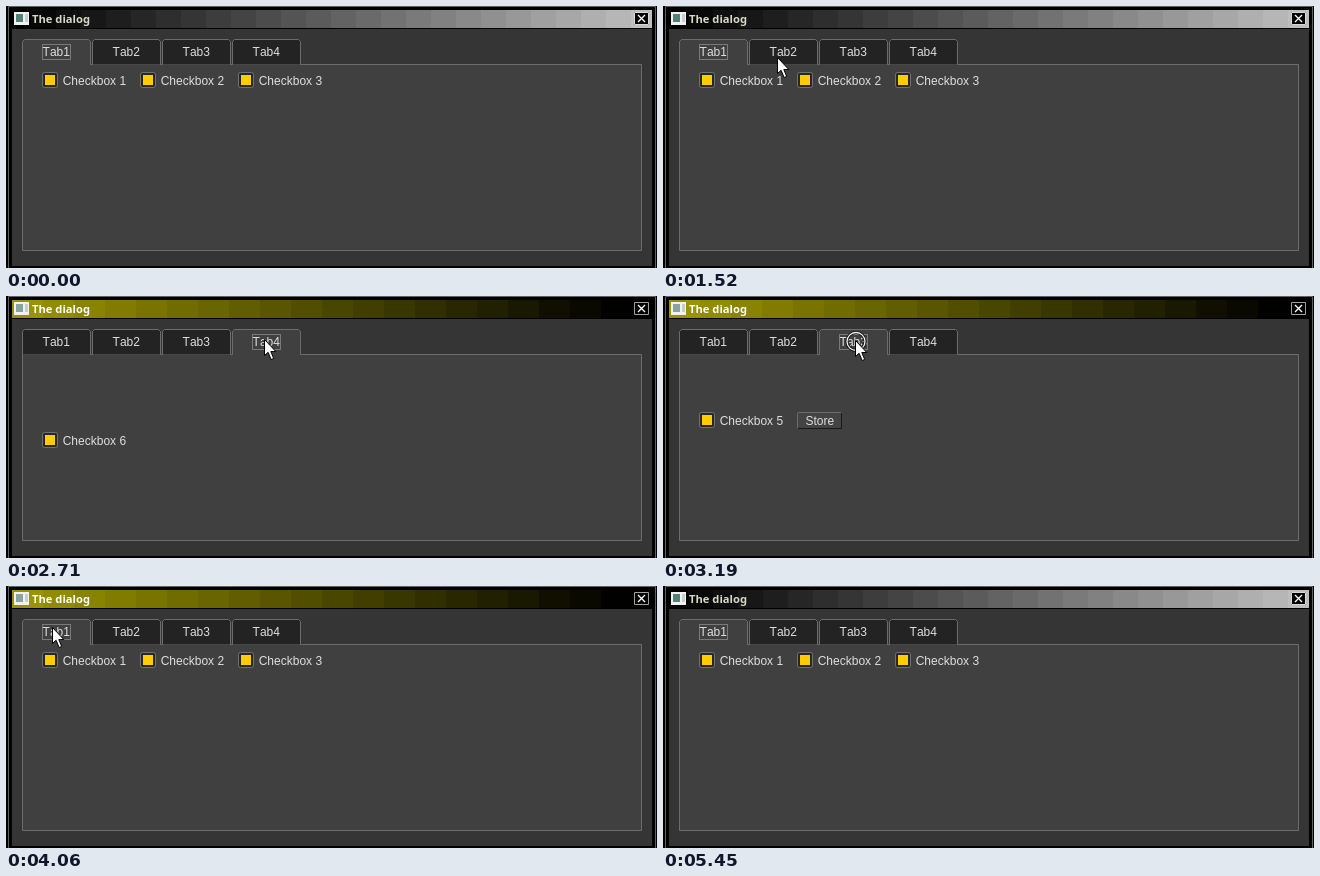
Animation, 651 px wide and 262 px high, one loop 5500 ms. Source, as an HTML page with a canvas:

```html
<!DOCTYPE html>
<html lang="en">
<head>
<meta charset="utf-8">
<title>Tabbed dialog</title>
<style>
  html, body { margin: 0; width: 100%; height: 100%; overflow: hidden; background: #000; }
  canvas { display: block; }
</style>
</head>
<body>
<canvas id="stage" width="651" height="262"></canvas>
<script>
const ctx = document.getElementById("stage").getContext("2d");
ctx.fontKerning = "none";

const LOOP = 5500, START = 620, STEP = 59.3, FOCUS_LOST = 5450;
const HELD_STEPS = 2;
const FONT = '12px "Liberation Sans", Arial, sans-serif';
const TITLE_FONT = 'bold 11.2px "Noto Sans", "Open Sans", sans-serif';
const BORDER = "#6c6c6c", PANEL = "#404040", TEXT = "#dedede";

const PAGES = [
  { y: 66, checks: [1, 2, 3], spot: { x: 46, y: 41 } },
  { y: 86, checks: [4, 5], spot: { x: 114, y: 51 } },
  { y: 116, checks: [5], button: "Store", spot: { x: 192, y: 44 } },
  { y: 136, checks: [6], spot: { x: 258, y: 43 } }
];

// The pointer rests at each stop from arrive to leave (in steps) and glides between stops.
const pass = (step, x, y) => ({ arrive: step, leave: step, x, y });
const visit = (tab, arrive, leave, press = arrive) =>
  ({ tab, arrive, leave, press, ...PAGES[tab].spot });

const STOPS = [
  pass(0, 391, 236),
  pass(9, 114, 68),
  visit(1, 15, 19, 17),
  visit(2, 25, 27),
  visit(3, 32, 37),
  visit(2, 42, 46),
  visit(1, 50, 50),
  visit(0, 56, 62),
  pass(67, 190, 75),
  pass(73, 590, 259)
];
const LAST_STEP = STOPS.at(-1).leave;

const ease = p => p * p * (3 - 2 * p);

function rect(x, y, w, h, color) {
  ctx.fillStyle = color;
  ctx.fillRect(x, y, w, h);
}

function frame(x, y, w, h, color, radius = 0) {
  ctx.beginPath();
  ctx.roundRect(x + .5, y + .5, w - 1, h - 1, radius);
  stroke(color);
}

function stroke(color, width = 1) {
  ctx.strokeStyle = color;
  ctx.lineWidth = width;
  ctx.stroke();
}

function text(label, x, y, color = TEXT, font = FONT) {
  ctx.font = font;
  ctx.fillStyle = color;
  ctx.fillText(label, x, y);
}

function drawTitleBar(active) {
  const left = active ? 6 : 0, band = active ? 31 : 25;
  for (let n = 0; left + n * band < 646; n++) {
    const x = Math.max(6, left + n * band);
    const gray = 7.6 * n, gold = Math.max(0, 153 - 8 * n);
    const color = active ? `rgb(${gold}, ${gold * .96}, 0)` : `rgb(${gray}, ${gray}, ${gray})`;
    rect(x, 4, 646 - x, 18, color);
  }

  rect(8, 6, 15, 13, "#f2f2f2");
  rect(10, 8, 7, 8, active ? "#8ba3a0" : "#538077");
  rect(19, 8, 3, 8, "#c5d0ce");
  text("The dialog", 26, 17, active ? "#fff" : "#d8d8c8", TITLE_FONT);

  rect(628, 6, 15, 13, "#000");
  frame(628, 6, 15, 13, active ? "#a0a0a0" : "#d8d8d8");
  ctx.beginPath();
  ctx.moveTo(632, 9); ctx.lineTo(639, 16);
  ctx.moveTo(639, 9); ctx.lineTo(632, 16);
  stroke("#fff", 1.3);
}

function drawTab(index, selected) {
  const x = 16 + 70 * index;
  ctx.beginPath();
  ctx.moveTo(x + .5, 58.5);
  ctx.lineTo(x + .5, 35.5);
  ctx.lineTo(x + 2.5, 33.5);
  ctx.lineTo(x + 66.5, 33.5);
  ctx.lineTo(x + 68.5, 35.5);
  ctx.lineTo(x + 68.5, 58.5);
  ctx.fillStyle = selected ? PANEL : "#232323";
  ctx.fill();
  stroke(BORDER);
  if (selected) rect(x + 1, 58, 67, 1, PANEL);
  text("Tab" + (index + 1), x + 20.6, 50);
  if (selected) {
    ctx.setLineDash([1, 1]);
    frame(x + 20, 38, 29, 16, "#b4b4b4");
    ctx.setLineDash([]);
  }
}

function drawPage({ y, checks, button }) {
  checks.forEach((number, column) => {
    const x = 36 + 98 * column;
    rect(x + 1, y + 1, 14, 14, "#282828");
    frame(x, y, 16, 16, "#707070", 2);
    rect(x + 3, y + 3, 10, 10, "#ffcc00");
    text("Checkbox " + number, x + 20.7, y + 13);
  });
  if (button) {
    rect(134, y, 45, 17, "#444");
    frame(134, y, 45, 17, BORDER, 1);
    rect(135, y + 16, 44, 1, "#191919");
    rect(178, y + 1, 1, 15, "#191919");
    text(button, 142.5, y + 13);
  }
}

function pointerAt(step) {
  const from = STOPS.findLast(stop => stop.arrive <= step);
  const to = STOPS[STOPS.indexOf(from) + 1];
  if (!to || step <= from.leave) return [from.x, from.y];
  const p = ease((step - from.leave) / (to.arrive - from.leave));
  return [from.x + (to.x - from.x) * p, from.y + (to.y - from.y) * p].map(Math.round);
}

function drawPointer(x, y, pressed) {
  if (pressed) {
    ctx.beginPath();
    ctx.arc(x + 1, y + 1.5, 9, 0, 2 * Math.PI);
    stroke("#111", 3);
    stroke("#f4f4f4", 1.3);
  }
  ctx.save();
  ctx.translate(x + .5, y + .5);
  ctx.fillStyle = "#fff";
  const arrow = new Path2D("M0 0V16L3.6 12.8 6.6 20 9.2 19 6.3 12H11.3Z");
  ctx.fill(arrow);
  ctx.strokeStyle = "#000";
  ctx.lineWidth = 1;
  ctx.stroke(arrow);
  ctx.restore();
}

function draw(time) {
  const step = Math.floor((time - START) / STEP);
  const click = STOPS.findLast(stop => stop.press <= step);
  const selected = click ? click.tab : 0;

  rect(0, 0, 651, 262, "#000");
  frame(2, 0, 648, 265, "#606060");
  rect(6, 23, 640, 237, "#353535");
  drawTitleBar(click && time < FOCUS_LOST);

  rect(16, 58, 620, 187, PANEL);
  frame(16, 58, 620, 187, BORDER);
  PAGES.forEach((page, i) => drawTab(i, i === selected));
  drawPage(PAGES[selected]);

  if (step >= 0 && step <= LAST_STEP) {
    const pressed = click && step - click.press < HELD_STEPS;
    drawPointer(...pointerAt(step), pressed);
  }
}

function tick() {
  draw(performance.now() % LOOP);
  requestAnimationFrame(tick);
}
tick();
</script>
</body>
</html>
```
